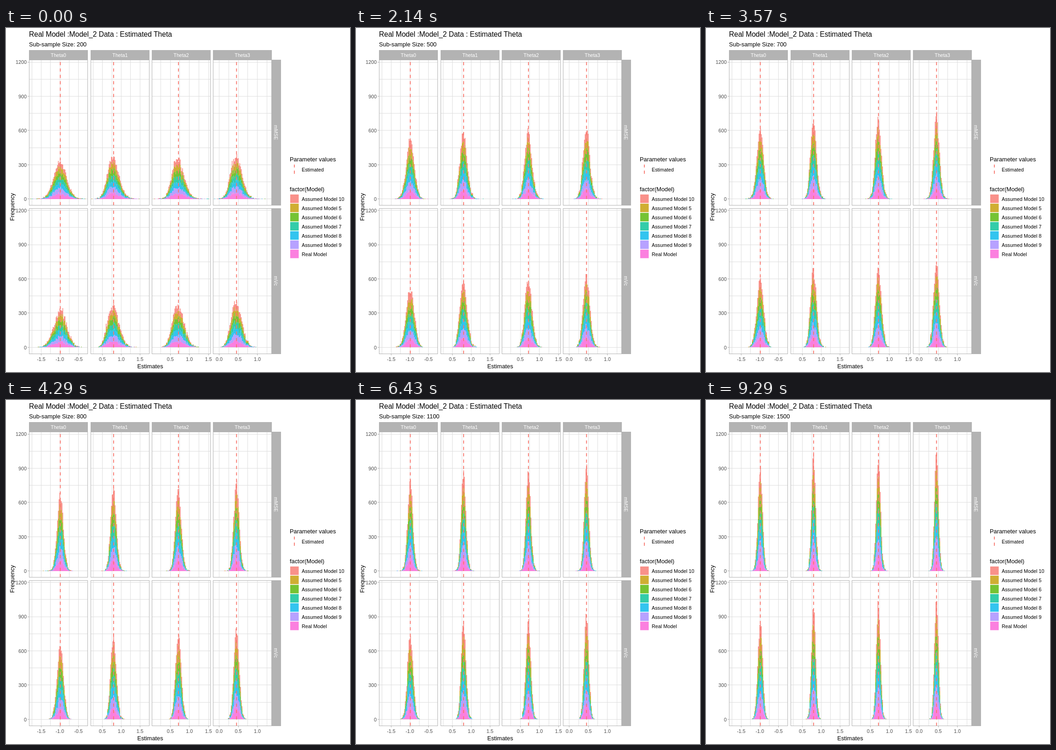
An HTML page that plays this animation: 748 by 748 pixels, repeating every 10000 ms.

```html
<!DOCTYPE html>
<html lang="en">
<head>
<meta charset="utf-8">
<title>Estimated Theta</title>
<style>
  html, body { margin: 0; width: 100%; height: 100%; overflow: hidden; background: #fff; }
  svg { display: block; width: 748px; height: 748px; font-family: "Liberation Sans", Arial, sans-serif; }
  .title { font-size: 15.6px; }
  .label { font-size: 12.8px; }
  .small { font-size: 10.8px; }
  .tick { font-size: 10.8px; fill: #4d4d4d; }
  .strip { font-size: 10.7px; fill: #fff; }
  .grid { stroke: #dedede; }
  .axis { stroke: #b3b3b3; }
  .border { stroke: #b3b3b3; fill: none; }
  .band { fill: #b3b3b3; }
  .bars { fill-opacity: .8; }
  .mean { stroke: #f8766d; stroke-width: 1.8; stroke-dasharray: 6.92; }
</style>
</head>
<body>
<svg id="stage" viewBox="0 0 748 748"></svg>
<script>
const stage = document.getElementById('stage');
const LOOP = 10000, STEPS = 14, BIN = 0.02, SAMPLES = 1000;
const PX_PER_COUNT = 74.4 / 300;

const models = [
  ['Assumed Model 10', '#f8766d'], ['Assumed Model 5', '#c49a00'],
  ['Assumed Model 6', '#53b400'], ['Assumed Model 7', '#00c094'],
  ['Assumed Model 8', '#00b6eb'], ['Assumed Model 9', '#a58aff'],
  ['Real Model', '#fb61d7']
];
// spread: standard deviation times the root of the sub-sample size, per row
const columns = [
  { left: 50, zero: 198, unit: 81, mean: -0.988, skew: -0.01, spread: [2.41, 2.5], ticks: [-1.5, -1, -0.5] },
  { left: 184, zero: 168.8, unit: 81.6, mean: 0.799, skew: 0.05, spread: [2.14, 2.16], ticks: [0.5, 1, 1.5] },
  { left: 317, zero: 315.8, unit: 82.9, mean: 0.714, skew: 0.04, spread: [2.16, 2.15], ticks: [0.5, 1, 1.5] },
  { left: 450, zero: 463.5, unit: 83, mean: 0.455, skew: 0.03, spread: [2.03, 2.01], ticks: [0, 0.5, 1] }
];
const rows = [
  { name: 'mMSE', top: 69, base: 371.7, tail: 0.018 },
  { name: 'mVc', top: 392, base: 694.2, tail: 0.003 }
];
const WIDTH = 127, HEIGHT = 316;

function add(tag, attrs, content) {
  const node = document.createElementNS('http://www.w3.org/2000/svg', tag);
  for (const key in attrs) node.setAttribute(key, attrs[key]);
  if (content !== undefined) node.textContent = content;
  return stage.appendChild(node);
}
const text = (content, x, y, cls, anchor = 'start', angle = 0) =>
  add('text', { x, y, class: cls, 'text-anchor': anchor, transform: `rotate(${angle} ${x} ${y})` }, content);
const line = (x1, y1, x2, y2, cls) => add('line', { x1, y1, x2, y2, class: cls });
const rect = (x, y, width, height, attrs) => add('rect', { x, y, width, height, ...attrs });
const crisp = v => Math.floor(v) + 0.5;

function randomizer(seed) {
  return () => {
    seed = (seed + 0x6d2b79f5) | 0;
    let t = Math.imul(seed ^ (seed >>> 15), 1 | seed);
    t = (t + Math.imul(t ^ (t >>> 7), 61 | t)) ^ t;
    return ((t ^ (t >>> 14)) >>> 0) / 4294967296;
  };
}

// One stepped outline per model, stacked from the last model upwards.
function histogram(col, row, rowIndex, size, seed) {
  const random = randomizer(seed);
  const sd = col.spread[rowIndex] / Math.sqrt(size);
  const skew = col.skew * Math.sqrt(200 / size);
  const tail = row.tail * Math.sqrt(200 / size);
  const first = Math.round((crisp(col.left) - col.zero) / col.unit / BIN) + 1;
  const count = Math.floor(WIDTH / col.unit / BIN) - 1;
  const heights = new Array(count).fill(0);
  const edge = i => (col.zero + (first + i - 0.5) * BIN * col.unit).toFixed(2);
  const level = n => Math.round(row.base - n * PX_PER_COUNT);
  const paths = [];
  for (let m = models.length - 1; m >= 0; m--) {
    const lower = heights.slice();
    for (let k = 0; k < SAMPLES; k++) {
      const z = Math.sqrt(-2 * Math.log(1 - random())) * Math.cos(2 * Math.PI * random());
      const value = col.mean + sd * (z + skew * (z * z - 1) + tail * z * z * z);
      const bin = Math.round(value / BIN) - first;
      if (bin >= 0 && bin < count) heights[bin]++;
    }
    let d = '', back = '';
    for (let i = 0; i < count; i++) {
      d += `${i ? 'L' : 'M'}${edge(i)} ${level(heights[i])}H${edge(i + 1)}`;
      back = `L${edge(i + 1)} ${level(lower[i])}H${edge(i)}` + back;
    }
    paths[m] = d + back + 'Z';
  }
  return paths;
}

text('Real Model :Model_2 Data : Estimated Theta', 50, 19, 'title');
const subtitle = text('', 50, 39.5, 'label');
text('Frequency', 17.5, 389, 'label', 'middle', -90);
text('Estimates', 313.5, 740, 'label', 'middle');

const panels = [];
rows.forEach((row, r) => {
  const bottom = row.top + HEIGHT;
  columns.forEach((col, c) => {
    const right = col.left + WIDTH;
    for (let n = 0; n <= 1200; n += 150) {
      const y = crisp(row.base - n * PX_PER_COUNT);
      line(col.left, y, right, y, 'grid');
    }
    for (let v = -2; v <= 2; v += 0.25) {
      const x = crisp(col.zero + v * col.unit);
      if (x > col.left && x < right) line(x, row.top, x, bottom, 'grid');
    }
    const layers = models.map(([, fill]) => add('path', { fill, class: 'bars' }));
    const x = col.zero + col.mean * col.unit;
    line(x, bottom + 0.5, x, row.top + 0.5, 'mean');
    rect(col.left + 0.5, row.top + 0.5, WIDTH, HEIGHT, { class: 'border' });
    panels.push({ col, row, r, c, layers });
  });
  rect(577, row.top, 21, HEIGHT + 1, { class: 'band' });
  text(row.name, 583.3, row.top + 158, 'strip', 'middle', 90);
  for (let n = 0; n <= 1200; n += 300) {
    const y = row.base - n * PX_PER_COUNT;
    line(47, crisp(y), 50, crisp(y), 'axis');
    text(n, 45, y + 4.3, 'tick', 'end');
  }
});

columns.forEach((col, c) => {
  rect(col.left, 48, WIDTH + 1, 21, { class: 'band' });
  text('Theta' + c, col.left + 64, 63, 'strip', 'middle');
  col.ticks.forEach(v => {
    const x = col.zero + v * col.unit;
    line(crisp(x), 709, crisp(x), 712, 'axis');
    text(v.toFixed(1), x, 724, 'tick', 'middle');
  });
});

text('Parameter values', 617, 289.5, 'label');
line(627, 317, 627, 297, 'mean');
text('Estimated', 643, 312, 'small');
text('factor(Model)', 617, 354.5, 'label');
models.forEach(([name, fill], i) => {
  rect(618, 362 + 20 * i, 18.5, 18.5, { fill, class: 'bars' });
  text(name, 643, 376 + 20 * i, 'small');
});

const states = Array.from({ length: STEPS }, (_, s) => {
  const size = 200 + 100 * s;
  return {
    size,
    shapes: panels.map((p, i) => histogram(p.col, p.row, p.r, size, 977 * s + 131 * i + 7))
  };
});

let shown = -1;
function show(step) {
  if (step === shown) return;
  shown = step;
  const { size, shapes } = states[step];
  subtitle.textContent = 'Sub-sample Size: ' + size;
  panels.forEach((p, i) => p.layers.forEach((layer, m) => layer.setAttribute('d', shapes[i][m])));
}

// Step times fall on whole hundredths of a second.
const stepAt = ms => Math.min(STEPS - 1, Math.floor((ms / 10 + 0.5) * STEPS * 10 / LOOP));

const start = performance.now();
function tick() {
  show(stepAt((performance.now() - start) % LOOP));
  requestAnimationFrame(tick);
}
tick();
</script>
</body>
</html>
```
